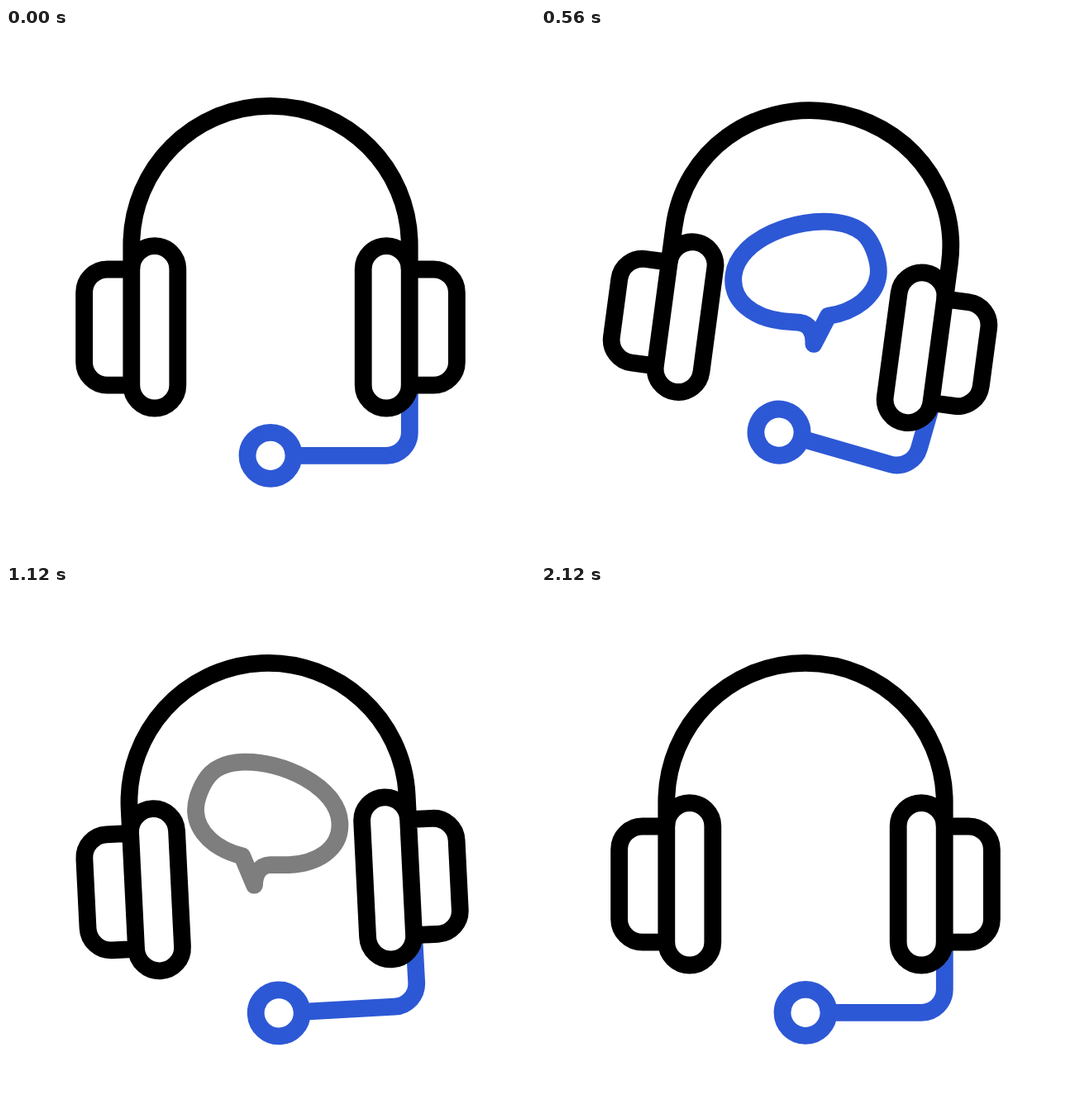
Animation of 640 by 640 pixels, one loop 2.48 s. Source, as an HTML page:

```html
<!DOCTYPE html>
<html lang="en">
<head>
<meta charset="utf-8">
<title>Headset</title>
<style>
  html, body { margin: 0; width: 100%; height: 100%; overflow: hidden; background: #fff; }
  svg { display: block; width: 100%; height: 100%; }
  g, path, circle { fill: none; stroke-width: 20.8; stroke-linejoin: round; }
  .ink { stroke: #000; }
  .blue { stroke: #2d58d5; }
</style>
</head>
<body>
<svg viewBox="0 0 640 640">
  <defs>
    <path id="bubble" d="M351 397.5C383 388 404.5 366 404.5 341C404.5 326 394 305 384 296C374 287 360 284 345 284C298 284 231 319 231 363C231 396 262 411 295 411C303 411 309 410 318 410C330 410 337 420 338 433.5Z"/>
    <path id="ear"/>
  </defs>
  <g id="head">
    <g id="mic" class="blue">
      <path d="M488.3 436V489.3a28 28 0 0 1-28 28H348"/>
      <circle cx="320" cy="517.3" r="28"/>
    </g>
    <g id="ask" class="blue"><use href="#bubble"/></g>
    <g id="reply" class="ink"><use href="#bubble" transform="translate(636.4) scale(-1 1)"/></g>
    <g class="ink">
      <path id="band"/>
      <use href="#ear"/>
      <use href="#ear" transform="translate(640) scale(-1 1)"/>
    </g>
  </g>
</svg>
<script>
  const LOOP = 2480, STEP = 40;
  const part = Object.fromEntries(
    ['head', 'mic', 'ask', 'reply', 'band', 'ear'].map(id => [id, document.getElementById(id)]));

  const sine = p => (1 - Math.cos(Math.PI * p)) / 2;
  const linear = p => p;

  // Keys are [time, value] pairs, held before the first and after the last.
  const track = (keys, ease = sine) => t => {
    const i = keys.findIndex(k => k[0] > t);
    if (i === 0) return keys[0][1];
    if (i < 0) return keys[keys.length - 1][1];
    const [t0, a] = keys[i - 1], [t1, b] = keys[i];
    return a + (b - a) * ease((t - t0) / (t1 - t0));
  };

  const tilt = track([[290, 0], [690, 10], [1090, -3], [1290, 0]]);
  const swing = track([[60, 0], [580, 8.45], [1000, -2.8], [1300, 4.5], [1500, -2.8], [1710, 3.75], [2120, 0]]);
  const bandDip = track([[70, 0], [280, 31], [660, 0]]);
  const earDip = track([[70, 0], [320, 28.5], [785, 0]]);

  // Bubble life, in ms after its start.
  const rise = track([[0, 12], [570, -83]], linear);
  const fade = track([[0, 0], [175, 1], [430, 1], [570, 0]], linear);

  function showBubble(el, age) {
    el.setAttribute('transform', `translate(0 ${rise(age)})`);
    el.setAttribute('opacity', fade(age));
  }

  function draw(t) {
    const e = earDip(t), top = 94.4 + bandDip(t);
    part.head.setAttribute('transform', `rotate(${tilt(t)} 320 320)`);
    part.mic.setAttribute('transform', `rotate(${t < 80 ? 0 : swing(t)} 488 441)`);
    // The side handles keep their length while the top sinks.
    part.band.setAttribute('d',
      `M151.8 ${292 + e}V262.6C151.8 169.7 227.1 ${top} 320 ${top}` +
      `S488.2 169.7 488.2 262.6V${292 + e}`);
    part.ear.setAttribute('d',
      `M151.8 ${291.7 + e}a28 28 0 0 1 56 0V432a28 28 0 0 1-56 0Z` +
      `M151.8 ${292 + e}H122.6a28 28 0 0 0-28 28V404.2a28 28 0 0 0 28 28H151.8`);
    showBubble(part.ask, t - 170);
    showBubble(part.reply, t - 620);
  }

  function tick() {
    const t = performance.now() % LOOP;
    draw(Math.floor(t / STEP) * STEP);
    requestAnimationFrame(tick);
  }
  tick();
</script>
</body>
</html>
```
